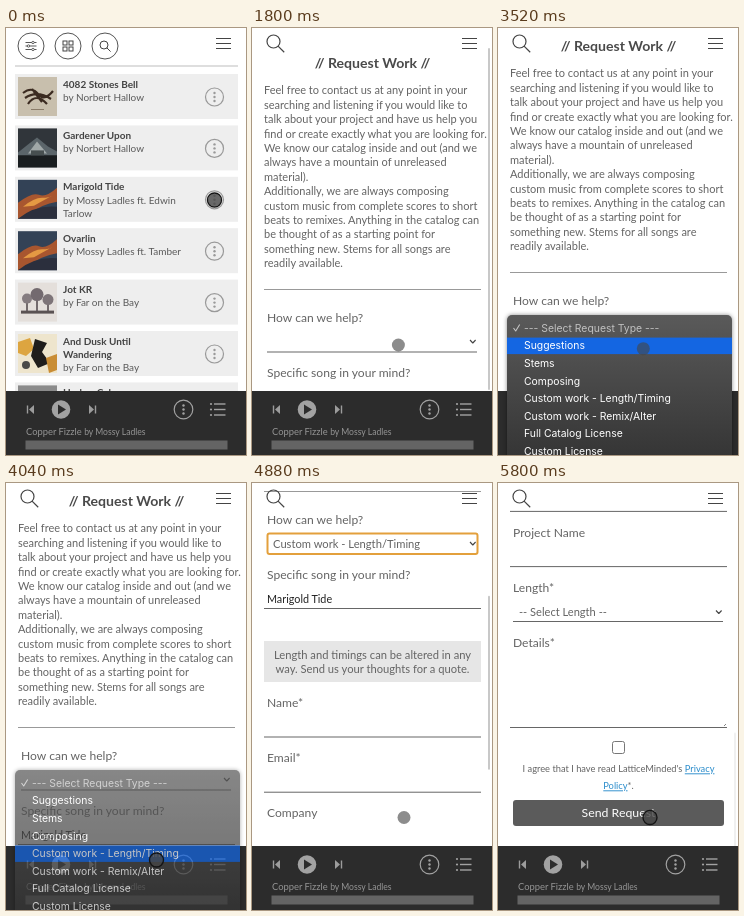
Write an HTML page that moves like this. It is 240 px wide and 427 px high and loops after 6000 ms.

```html
<!DOCTYPE html>
<html lang="en">
<head>
<meta charset="utf-8">
<title>Song request</title>
<style>
html, body { margin: 0; width: 100%; height: 100%; overflow: hidden; background: #fff; }
svg { display: block; width: 240px; height: 427px; }
text { font-family: Lato, sans-serif; white-space: pre; }
#popup { filter: drop-shadow(0 0 2px rgba(0, 0, 0, .45)); }
#popup text { font-family: Inter, sans-serif; }
</style>
</head>
<body>
<svg id="stage" viewBox="0 0 240 427" xmlns="http://www.w3.org/2000/svg"></svg>
<script>
const LOOP = 6000, STEP = 40;
const clamp = v => Math.max(0, Math.min(1, v));
const span = (t, a, b) => clamp((t - a) / (b - a));
const easeOut = p => 1 - (1 - p) ** 2;
const easeInOut = p => p * p * (3 - 2 * p);

// Drawing helpers; text is placed by the middle of its capitals.
const text = (x, y, s, size, fill = '#646464', extra = '') =>
  `<text x="${x}" y="${(y + size * 0.36).toFixed(2)}" font-size="${size}" fill="${fill}" ${extra}>${s}</text>`;
const mid = 'text-anchor="middle"';
const bold = 'font-weight="700"';
const rect = (x, y, w, h, fill, extra = '') =>
  `<rect x="${x}" y="${y}" width="${w}" height="${h}" fill="${fill}" ${extra}/>`;
const path = (d, stroke = '#444', w = 1.2, fill = 'none') =>
  `<path d="${d}" stroke="${stroke}" stroke-width="${w}" fill="${fill}" stroke-linejoin="round"/>`;
const circle = (x, y, r, stroke = '#444', fill = 'none', w = 1.2) =>
  `<circle cx="${x}" cy="${y}" r="${r}" stroke="${stroke}" fill="${fill}" stroke-width="${w}"/>`;
const at = (x, y, s) => `<g transform="translate(${x} ${y})">${s}</g>`;
const dots = (x, y, r, c) => circle(x, y, r, c) +
  [-4, 0, 4].map(k => circle(x, y + k, 1.2, 'none', c)).join('');

const covers = {
  tangle: rect(0, 0, 39, 39, '#c8bfad') +
    path('M5 16Q14 9 20 17T35 14M7 21Q19 13 33 22M10 27Q18 15 29 27M14 12L24 25', '#3b2b21', 2.2) +
    rect(13, 32, 13, 1, '#8a7c69'),
  house: rect(0, 0, 39, 39, '#30353a') + path('M0 24L10 16L19 9L30 18L39 23V27H0Z', 'none', 0, '#5b656a') +
    path('M10 25L19 13L29 25Z', 'none', 0, '#a0a8a8') + rect(0, 27, 39, 12, '#191d1f') +
    rect(13, 22, 13, 5, '#474f50'),
  dusk: rect(0, 0, 39, 39, '#334256') + path('M0 23Q14 12 21 15T39 8V22Q23 25 13 33L0 39Z', 'none', 0, '#a8562f') +
    path('M5 27Q16 18 24 18T34 16Q23 22 16 26Z', 'none', 0, '#e59a43') +
    path('M0 39Q17 25 39 27V39Z', 'none', 0, '#2b2f3d'),
  trees: rect(0, 0, 39, 39, '#e4dfdb') + path('M9 29V15M19 29V11M30 29V16', '#4d4649', 1.5) +
    circle(9, 16, 5, 'none', '#857c80') + circle(19, 12, 6.5, 'none', '#736a6f') +
    circle(30, 17, 5.5, 'none', '#7d7478') + rect(3, 28, 33, 3, '#5a5253'),
  blots: rect(0, 0, 39, 39, '#eee5cd') + path('M0 8L12 4L16 15L8 22L0 19Z', 'none', 0, '#dda540') +
    path('M17 5L29 9L24 18L32 29L20 34L13 22Z', 'none', 0, '#1f1d1b') +
    path('M28 24L39 20V36L31 39Z', 'none', 0, '#c98d35') + circle(8, 31, 4, 'none', '#4b4a48'),
  haze: rect(0, 0, 39, 39, '#8b8b8b')
};

const songs = [
  ['4082 Stones Bell', 'by Norbert Hallow', 'tangle'],
  ['Gardener Upon', 'by Norbert Hallow', 'house'],
  ['Marigold Tide', 'by Mossy Ladles ft. Edwin|Tarlow', 'dusk'],
  ['Ovarlin', 'by Mossy Ladles ft. Tamber', 'dusk'],
  ['Jot KR', 'by Far on the Bay', 'trees'],
  ['And Dusk Until|Wandering', 'by Far on the Bay', 'blots'],
  ['Harbor Calm', '', 'haze']
];

function songRow([title, by, art], i) {
  const y = 46 + i * 51.4;
  const lines = [...title.split('|').map(s => [s, bold, '#444']), ...by.split('|').map(s => [s, '', '#5a5a5a'])];
  return rect(9, y, 223, 45, '#eeeeee') + at(12, y + 3, covers[art]) +
    lines.map(([s, w, c], k) => text(57, y + 10 + k * 13.2, s, 10, c, w)).join('') +
    dots(208.5, y + 23, 9, '#999');
}

const lens = (x, y, r, w) => circle(x, y, r, '#444', 'none', w) +
  path(`M${x + r * 0.7} ${y + r * 0.7}l${r * 0.95} ${r * 0.95}`, '#444', w);
const listIcons = [25, 62, 99].map(x => circle(x, 18, 13, '#555', '#fff', 1)).join('') +
  path('M19.5 14.5h11M19.5 18h11M19.5 21.5h11', '#444', 0.9) +
  [[27, 14.5], [22.5, 18], [27, 21.5]].map(([x, y]) => circle(x, y, 1.2, '#444', '#fff', 0.8)).join('') +
  [0, 6].map(a => [0, 6].map(b => rect(57 + a, 13 + b, 4, 4, 'none', 'stroke="#444"')).join('')).join('') +
  lens(98, 17, 4, 1);

// Sheet of actions
const star = path('M' + Array.from({ length: 16 }, (_, i) => {
  const a = i * Math.PI / 8, r = i % 2 ? 7.6 : 10;
  return (r * Math.sin(a)).toFixed(1) + ' ' + (-r * Math.cos(a)).toFixed(1);
}).join('L') + 'Z');
const ring = circle(0, 0, 8.8);
const note = path('M-1.5 3V-4L3.5 -5V2') + circle(-2.8, 3, 1.4, 'none', '#444') + circle(2.2, 2, 1.4, 'none', '#444');
const actions = [
  [107, 124, 'Play', ring + path('M-2.5 -4L4 0L-2.5 4Z', 'none', 0, '#444')],
  [84, 101, 'Add to Queue', ring + path('M-4 0H4M0 -4V4')],
  [85, 102, 'Similar Songs', path('M-8 -2Q-3 -5 1 -2T7 -3M-8 1Q-3 -2 1 1T7 0M-8 4Q-3 1 1 4T7 3', '#444', 1) +
    path('M2 7Q-3 8 -2 3T2 -4T0 -8V6', '#444', 1.2)],
  [81, 97, 'See Song Page', star + note],
  [81, 98, 'See Artist Page', star + circle(0, -2, 2.6) + path('M-4.5 6Q-4 1.5 0 1.5T4.5 6')],
  [103, 119, 'Share', path('M-4 0L5 -5M-4 0L5 5') +
    [[-5.5, 0], [5.5, -5.5], [5.5, 5.5]].map(([x, y]) => circle(x, y, 2.8, '#444', '#d0d0d0')).join('')],
  [101, 117, 'Inquiry', path('M-6 6A8.5 8.5 0 1 1 1 8.5L-5 9.5Z') + text(0, 0, '?', 11, '#444', mid)],
  [99, 115, 'License', ring + text(0, 0, '$', 11, '#444', mid)]
];
const sheet = rect(0, 57, 240, 34, '#2b2b2b') + at(76, 64, `<g transform="scale(.54)">${covers.dusk}</g>`) +
  text(104, 74, 'Marigold Tide', 10.8, '#8a8a8a') + rect(0, 91, 240, 273, '#d0d0d0') +
  actions.map(([ix, tx, s, icon], i) => {
    const y = 108 + i * 34;
    return at(ix, y, icon) + text(tx, y, s, 11, '#2e2e2e') +
      (i ? rect(0, y - 17.5, 240, 1, '#a6a6a6') : '');
  }).join('');

// Request form
const intro = ['Feel free to contact us at any point in your', 'searching and listening if you would like to',
  'talk about your project and have us help you', 'find or create exactly what you are looking for.',
  'We know our catalog inside and out (and we', 'always have a mountain of unreleased', 'material).',
  'Additionally, we are always composing', 'custom music from complete scores to short',
  'beats to remixes. Anything in the catalog can', 'be thought of as a starting point for',
  'something new. Stems for all songs are', 'readily available.'];
const label = (y, s) => text(15, y, s, 12.1);
const rule = (y, x = 12, w = 217, c = '#666') => rect(x, y - 0.5, w, 1, c);
const chevron = y => path(`M218 ${y - 1.5}l2.8 3l2.8 -3`, '#444', 1.1);
const link = s => `<tspan fill="#2a8ccb" text-decoration="underline">${s}</tspan>`;
const choice = 'Custom work - Length/Timing';
const form = text(120.5, 18, '// Request Work //', 14.1, '#4a4a4a', bold + ' ' + mid) +
  intro.map((s, i) => text(12, 45.5 + i * 14.4, s, 11)).join('') + rule(244.5, 12, 217, '#999') +
  label(272.5, 'How can we help?') +
  `<g id="blank">${rule(307, 15, 210)}</g>` +
  `<g id="chosen">${rect(15.5, 286.5, 210, 20.5, '#fff', 'rx="2" stroke="#e3a03c" stroke-width="2"')}${text(21, 296.5, choice, 11.2)}</g>` +
  chevron(296.5) + label(327.5, 'Specific song in your mind?') +
  text(15, 352, 'Marigold Tide', 10.8, '#222') + rule(361.5) +
  rect(12, 394, 217, 41, '#e6e6e6') +
  text(120.5, 408, 'Length and timings can be altered in any', 11.2, '#646464', mid) +
  text(120.5, 422, 'way. Send us your thoughts for a quote.', 11.2, '#646464', mid) +
  ['Name*', 'Email*', 'Company', 'Project Name'].map((s, i) => label(455.5 + i * 55.3, s) + rule(490 + i * 55.2)).join('') +
  label(676.5, 'Length*') + text(21, 701, '-- Select Length --', 11.1) + chevron(701) + rule(710.5, 15, 210) +
  label(731.5, 'Details*') + rule(816.5) + path('M226 815l2 -2', '#666', 0.8) +
  rect(114.5, 830.5, 12, 12, '#fff', 'rx="2" stroke="#777"') +
  text(120.5, 858, "I agree that I have read LatticeMinded's " + link('Privacy'), 9.3, '#646464', mid) +
  text(120.5, 875, link('Policy') + '*.', 9.3, '#646464', mid) +
  rect(15, 889, 211, 26, '#5b5b5b', 'rx="3"') + text(120.5, 902, 'Send Request', 12.3, '#fff', mid);

const player = rect(0, 363, 240, 64, '#2c2c2c') +
  path('M21.5 377.5V385.5', '#9c9c9c', 1.4) + path('M28 377V386L23 381.5Z', 'none', 0, '#9c9c9c') +
  circle(55, 381.5, 9.3, 'none', '#a2a2a2') + path('M52 376.5L60 381.5L52 386.5Z', 'none', 0, '#2c2c2c') +
  path('M89.5 377.5V385.5', '#9c9c9c', 1.4) + path('M83 377V386L88 381.5Z', 'none', 0, '#9c9c9c') +
  dots(177.5, 381.5, 9.3, '#a2a2a2') +
  [376, 381.5, 387].map(y => circle(205, y, 1.1, 'none', '#a2a2a2') + rect(208, y - 0.7, 11.5, 1.4, '#a2a2a2')).join('') +
  text(20, 403.3, 'Copper Fizzle <tspan font-size="8.6">by Mossy Ladles</tspan>', 9.4, '#959595') +
  rect(19.5, 412.5, 202, 9, '#646464');

const options = ['--- Select Request Type ---', 'Suggestions', 'Stems', 'Composing', choice,
  'Custom work - Remix/Alter', 'Full Catalog License', 'Custom License'];
const optionY = i => 300 + i * 17.6;
const popup = rect(9, 287, 225, 150, 'url(#shade)', 'rx="5"') +
  rect(9, 0, 225, 16.5, '#1466e2', 'id="pick"') + path('M15.5 300l2.2 3l4 -6.5', '#c4c4c4', 1.1) +
  options.map((s, i) => text(26, optionY(i), s, 10.4, i ? '#fff' : '#c0c0c0')).join('');

document.getElementById('stage').innerHTML = `
<defs><linearGradient id="shade" x2="0" y2="1"><stop stop-color="#5a5a5a"/><stop offset="1" stop-color="#333"/></linearGradient></defs>
${rect(0, 0, 240, 427, '#fff')}
<g id="list">${rect(9, 37, 223, 2, '#dedede')}${songs.map(songRow).join('')}
${rect(0, 0, 240, 363, '#000', 'id="dim"')}${listIcons}</g>
<g id="sheet">${sheet}</g>${rect(199, 162, 20, 20, '#8cc6ec', 'id="tap"')}
<g id="page">${rect(0, 0, 240, 363, '#fff')}<g id="form">${form}</g>${lens(21.5, 13.5, 6.5, 1.2)}</g>
${path('M210 10.5h15M210 15.5h15M210 20.5h15', '#444', 1.2)}
${rect(236, 0, 2, 10, '#c8c8c8', 'id="thumb" rx="1"')}
${player}
<g id="popup">${popup}</g>
<g id="cursor">${circle(0, 0, 6.5, 'none', '#464646')}<circle id="ring" fill="none" stroke="#151515" stroke-width="1.4"/></g>`;

const el = {};
for (const n of document.querySelectorAll('[id]')) el[n.id] = n;
const set = (id, attrs) => { for (const k in attrs) el[id].setAttribute(k, attrs[k]); };
const move = (id, x, y) => set(id, { transform: `translate(${x} ${y})` });

// Each move: start, end, x, y
const moves = [[1080, 1280, 146.4, 317], [2320, 2520, 143.5, 301], [3360, 3840, 150.5, 377], [4240, 4600, 152, 334.5]];
const presses = [[-400, 80], [640, 960], [1280, 1440], [2600, 2840], [3840, 4080], [5640, 6000]];

function cursorAt(t) {
  let x = 208.5, y = 172;
  for (const [a, b, nx, ny] of moves) {
    const p = easeInOut(span(t, a, b));
    x += (nx - x) * p;
    y += (ny - y) * p;
  }
  return [x, y];
}

function draw(t) {
  const open = easeOut(span(t, 560, 800));
  set('dim', { opacity: 0.34 * open });
  move('sheet', 0, 306 * (1 - open));
  set('tap', { opacity: t < 640 ? 0 : 1 - span(t, 840, 960) });

  const shown = span(t, 1360, 1600);
  set('page', { opacity: shown });
  set('list', { opacity: shown < 1 ? 1 : 0 });

  const late = t > 4160;
  const y = late ? -Math.round(572 * easeOut(span(t, 4680, 5537))) : t < 1800 ? 34 : t < 1840 ? 17 : 0;
  move('form', 0, y);
  set('blank', { opacity: late ? 0 : 1 });
  set('chosen', { opacity: late ? 1 : 0 });

  const top = late ? (41 - y) * 0.407 : 37 - y;
  set('thumb', {
    y: top, height: late ? 174 : 325 + y,
    opacity: late ? (t < 4720 ? 0 : 1 - span(t, 5640, 5860)) : t < 1800 ? 0 : 1 - span(t, 2040, 2200)
  });

  const [cx, cy] = cursorAt(t);
  move('cursor', cx, cy);
  const press = presses.find(([a, b]) => t >= a && t < b);
  const r = press ? 16.6 - 9.6 * clamp((t - press[0]) / 160) : 0;
  set('ring', { r, opacity: press ? 1 : 0 });
  el.cursor.firstChild.setAttribute('opacity', press && r < 8 ? 0.8 : 0.62);

  set('popup', { opacity: Math.min(span(t, 2720, 2840), clamp((4160 - t) / 165)) });
  const i = Math.max(0, Math.min(7, Math.round((cy - 300) / 17.6)));
  set('pick', { y: optionY(i) - 8, opacity: i ? 1 : 0 });
}

const begin = performance.now();
function tick() {
  const t = (performance.now() - begin) % LOOP;
  draw(Math.floor(t / STEP) * STEP);
  requestAnimationFrame(tick);
}
tick();
</script>
</body>
</html>
```
